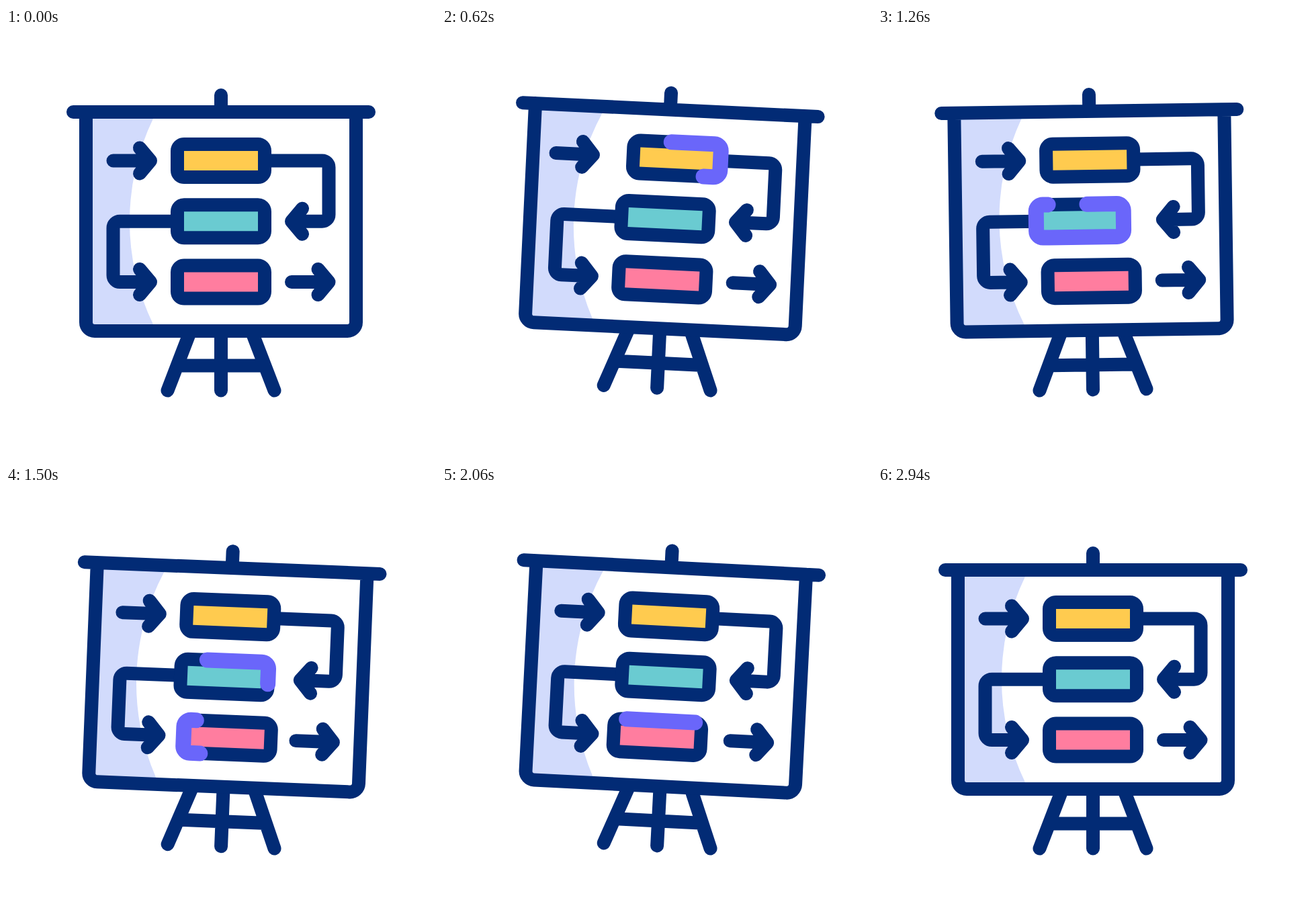
Write an HTML page that moves like this. It is 640 by 640 pixels and loops after 3200 ms.

```html
<!DOCTYPE html>
<html lang="en">
<head>
<meta charset="utf-8">
<title>Workflow board</title>
<style>
  html, body { margin: 0; height: 100%; overflow: hidden; background: #fff; }
  svg { display: block; width: 100vw; height: 100vh; }
  .ink { fill: none; stroke: #022b75; stroke-width: 20; stroke-linecap: round; stroke-linejoin: round; }
  .ring { fill: none; stroke: #6a66fa; stroke-width: 23; stroke-linecap: round; }
</style>
</head>
<body>
<svg viewBox="0 0 640 640">
  <g id="stand">
    <path fill="#d2dbfc" d="M119 125H224L219 135A352 352 0 0 0 219 441V451H119z"/>
    <g class="ink">
      <path d="M273 455L240.5 539.5M367 455L399.5 539.5M320 455V539.5M258 502.5H382"/>
      <path d="M119 125V438a13 13 0 0 0 13 13H508a13 13 0 0 0 13 -13V125M100 125H540M320 100V125"/>
      <path id="arrow0"/><path id="arrow1"/><path id="arrow2"/><path id="arrow3"/>
    </g>
    <g id="boxes"></g>
  </g>
</svg>
<script>
const LOOP = 3200, STEP = 20;
const $ = id => document.getElementById(id);

const clamp = x => Math.min(1, Math.max(0, x));
const ramp = (t, from, to) => clamp((t - from) / (to - from));
const ease = x => (1 - Math.cos(Math.PI * x)) / 2;

// Rises smoothly from 0 to 1 at the peak and falls back to 0
const pulse = (t, start, peak, end) =>
  ease(t < peak ? ramp(t, start, peak) : 1 - ramp(t, peak, end));

// The stand rocks on one foot, then on the other (degrees)
const rightTilt = t => 3 * (pulse(t, 110, 540, 960) + pulse(t, 1290, 1600, 1890)
  + pulse(t, 1850, 2040, 2240)) + pulse(t, 2660, 2800, 2940);
const leftTilt = t => 2.2 * (pulse(t, 600, 1000, 1440) + pulse(t, 2080, 2290, 2700))
  + 3 * pulse(t, 1630, 1840, 2060);

// An arrow strikes its box at u = 0: the arrow recoils, the box slides and rebounds
const arrowShift = u => 10 * pulse(u, -100, 0, 180) - 6.5 * pulse(u, 180, 400, 600);
const boxShift = u => 16.5 * pulse(u, 0, 300, 640) - 8 * pulse(u, 500, 640, 730);
const lastShift = t => 6 * (pulse(t, 2260, 2400, 2620) - pulse(t, 1960, 2110, 2260));

// The highlight runs out fast, then its tail catches up
const ringEnd = u => .83 * ramp(u, 0, 270) + .17 * ramp(u, 270, 640);
const ringStart = u => .5 * ramp(u, 270, 405) + .2 * ramp(u, 405, 640) + .3 * ramp(u, 640, 720);

const steps = [
  { y: 197.5, color: '#ffcb4f', dir: 1, hit: 220 },
  { y: 287.7, color: '#6acbd1', dir: -1, hit: 990 },
  { y: 378, color: '#ff7d9f', dir: 1, hit: 1420 }
];

$('boxes').innerHTML = steps.map(s => `<g>
  <rect class="ink" x="-65" y="-24.5" width="130" height="49" rx="10" style="fill:${s.color}"/>
  <path class="ring" pathLength="1" d="M-47 -24.5H-55a10 10 0 0 0 -10 10v29a10 10 0 0 0 10 10
    h110a10 10 0 0 0 10 -10v-29a10 10 0 0 0 -10 -10z"/></g>`).join('');
const boxes = [...$('boxes').children];

const head = (x, y, dir) => `H${x}M${x - 16 * dir} ${y - 19}L${x} ${y}L${x - 16 * dir} ${y + 19}`;

function draw(t) {
  $('stand').setAttribute('transform',
    `rotate(${-leftTilt(t)} 240 540) rotate(${rightTilt(t)} 400 540)`);

  const [a, b, c] = steps.map(s => s.dir * arrowShift(t - s.hit));
  const d = lastShift(t);
  $('arrow0').setAttribute('d', `M${159.5 + a} 197.5` + head(215 + a, 197.5, 1));
  $('arrow1').setAttribute('d', 'M320 197.5H470.5a10 10 0 0 1 10 10V277.7a10 10 0 0 1 -10 10'
    + head(425 + b, 287.7, -1));
  $('arrow2').setAttribute('d', 'M320 287.7H169.5a10 10 0 0 0 -10 10V368a10 10 0 0 0 10 10'
    + head(215 + c, 378, 1));
  $('arrow3').setAttribute('d', `M${425 + d} 378` + head(480.5 + d, 378, 1));

  steps.forEach((s, i) => {
    const u = t - s.hit, ring = boxes[i].lastElementChild;
    const from = ringStart(u), size = ringEnd(u) - from;
    boxes[i].setAttribute('transform', `translate(${320 + s.dir * boxShift(u)} ${s.y})`);
    ring.style.display = size > .001 ? '' : 'none';
    ring.setAttribute('stroke-dasharray', `${size} 2`);
    ring.setAttribute('stroke-dashoffset', -from);
  });
}

function tick() {
  draw(Math.floor(performance.now() % LOOP / STEP) * STEP);
  requestAnimationFrame(tick);
}
tick();
</script>
</body>
</html>
```
